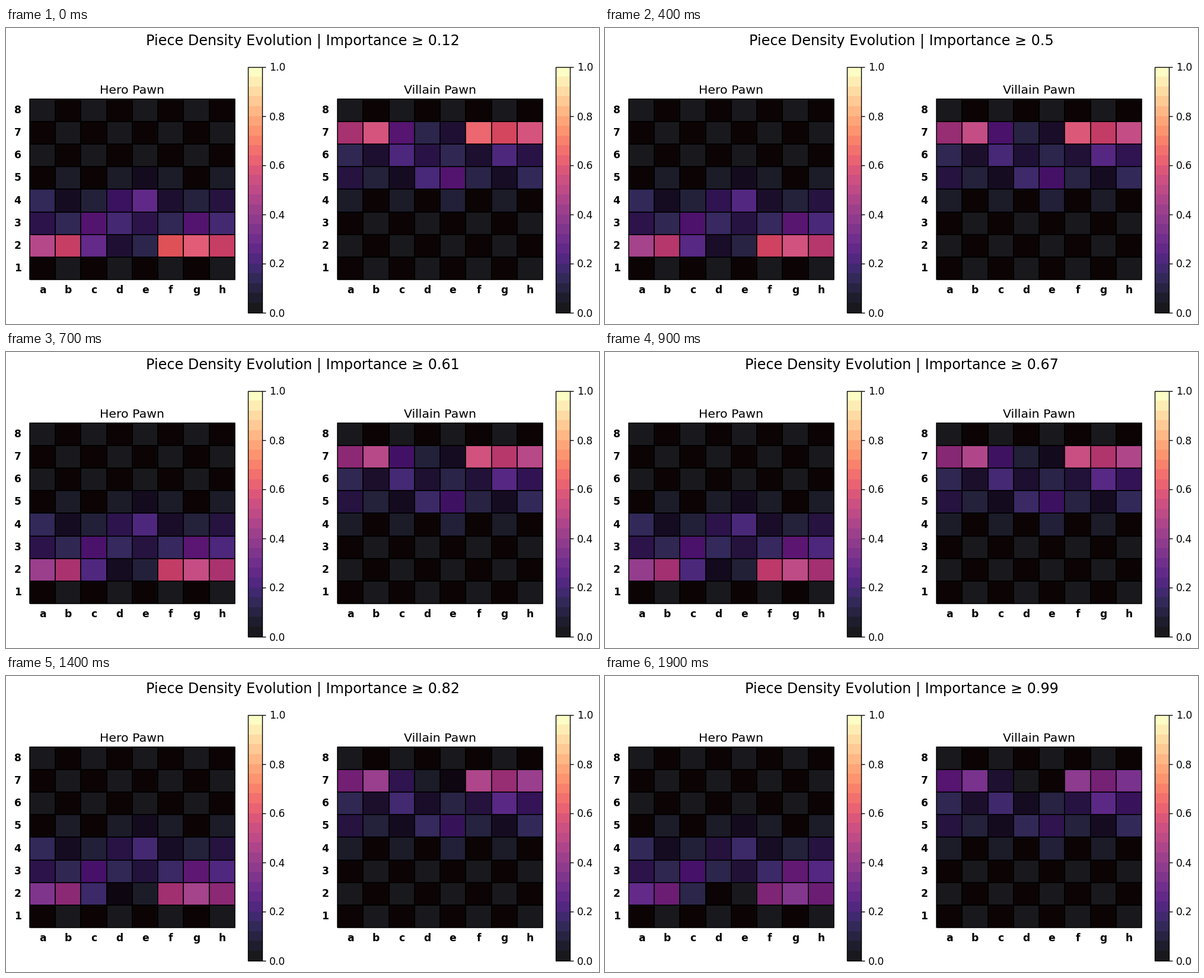
A matplotlib script for the animation above (2000 ms loop, 1000 px wide and 500 px high).

```python
import numpy as np
import matplotlib.pyplot as plt
from matplotlib.animation import FuncAnimation
from matplotlib.cm import ScalarMappable
from matplotlib.colors import ListedColormap, Normalize

W, H, DPI = 1000, 500, 100
FRAMES, INTERVAL = 20, 100
FIRST, LAST = 0.12, 0.99
SCALE = 1.23
ALPHA = 0.9
LIGHT, DARK = "#ffffff", "#782808"

plt.rcParams["font.family"] = "DejaVu Sans"

FILES = np.arange(8)
CHECKS = np.add.outer(FILES, FILES) % 2


def level_at(frame):
    """Importance threshold, rising quickly at first and then steadily."""
    knots = [0, 2, 4, 7, 11, 14, 16, 19]
    values = [FIRST, 0.38, 0.5, 0.61, 0.72, 0.82, 0.89, LAST]
    return float(np.interp(frame, knots, values))


def bump(center, width):
    return np.exp(-((FILES - center) / width) ** 2)


def density(level, villain):
    """Pawn density by rank: pawns leave home as the threshold rises."""
    p = (level - FIRST) / (LAST - FIRST)
    grid = np.zeros((8, 8))

    # Home rank: full wings and an empty centre, thinning with time.
    home = np.interp(FILES, [0, 1, 2, 3, 4, 5, 7],
                     [0.48, 0.565, 0.255, 0.105, 0.105, 0.64, 0.565])
    grid[1] = home - (0.08 + 0.3 * home) * p ** 2

    # One step: the same pattern on both wings, drifting to the king's side.
    wing = np.tile([0.13, 0.105, 0.22, 0.155], 2) * (0.9 if villain else 1.12)
    grid[2] = wing + p * (0.04 * (FILES > 4) - 0.07 * bump(3, 1.2))

    # Two steps: the d and e pawns, with a little at the edges.
    edge = (np.abs(FILES - 3.5) / 3.5) ** 4
    grid[3] = 0.055 + 0.07 * edge + (0.21 - 0.1 * p) * bump(3.7, 1)

    # Three steps: traces on light squares and the e file.
    light = CHECKS[3 if villain else 4]
    grid[4] = np.maximum(0.035 * light, 0.065 * bump(4, 0.4))

    grid = grid.clip(0, 1)
    return grid[::-1] if villain else grid


def add_axes(left, top, right, bottom):
    return fig.add_axes([left / W, 1 - bottom / H,
                         (right - left) / W, (bottom - top) / H])


def label(x, y, text, size, **style):
    return fig.text(x / W, 1 - y / H, text, fontsize=size * SCALE,
                    ha="center", **style)


def panel(left, title, villain):
    top, right, bottom = 120.3, left + 346, 424.7
    ax = add_axes(left, top, right, bottom)
    ax.axis("off")
    edges = np.arange(9)
    ax.pcolormesh(edges, edges, CHECKS, cmap=ListedColormap([DARK, LIGHT]),
                  vmin=0, vmax=1)
    mesh = ax.pcolormesh(edges, edges, density(FIRST, villain), cmap="magma",
                         vmin=0, vmax=1, alpha=ALPHA, edgecolors="black",
                         linewidth=SCALE, antialiased=True, clip_on=False)
    ax.set_xlim(0, 8)
    ax.set_ylim(0, 8)

    label((left + right) / 2, 111, title, 12, va="baseline")
    cell_w, cell_h = (right - left) / 8, (bottom - top) / 8
    for i in FILES:
        label(left + (i + 0.5) * cell_w, 448, "abcdefgh"[i], 10,
              weight="bold", va="baseline")
        label(left - 20.5, bottom - (i + 0.5) * cell_h, str(i + 1), 10,
              weight="bold", va="center")

    cax = add_axes(left + 368, 65.5, left + 392, 480.5)
    scale = ScalarMappable(Normalize(0, 1), plt.get_cmap("magma", 25))
    bar = fig.colorbar(scale, cax=cax, alpha=ALPHA, ticks=np.arange(6) / 5)
    bar.outline.set_linewidth(0.8 * SCALE)
    cax.tick_params(labelsize=10 * SCALE, length=3.5 * SCALE,
                    pad=3.5 * SCALE, width=0.8 * SCALE)
    return mesh


fig = plt.figure(figsize=(W / DPI, H / DPI), dpi=DPI, facecolor="white")
heading = label(500, 29, "", 14, va="baseline")
hero = panel(40, "Hero Pawn", villain=False)
villain = panel(559, "Villain Pawn", villain=True)


def update(frame):
    level = level_at(frame)
    heading.set_text(f"Piece Density Evolution | Importance ≥ {round(level, 2)}")
    hero.set_array(density(level, villain=False))
    villain.set_array(density(level, villain=True))
    return heading, hero, villain


anim = FuncAnimation(fig, update, frames=FRAMES, interval=INTERVAL,
                     repeat=True, repeat_delay=0, blit=False)
plt.show()
```
